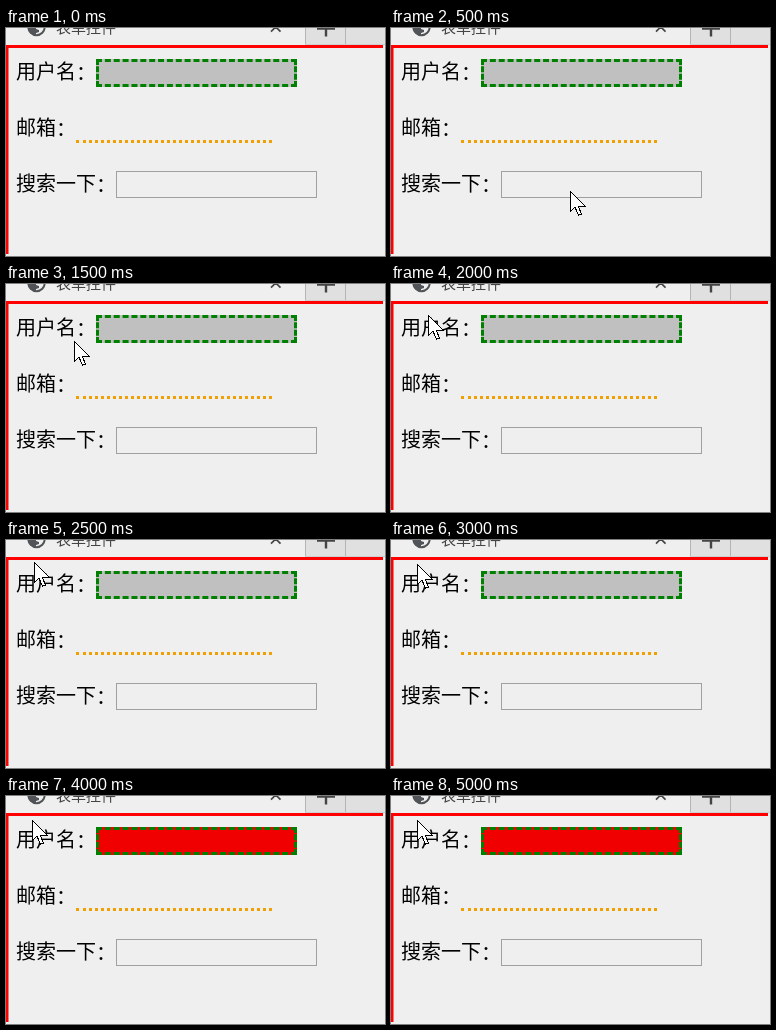
An HTML page that plays this animation: 379x228 px, repeating every 5500 ms.

```html
<!DOCTYPE html>
<html lang="zh-CN">
<head>
<meta charset="utf-8">
<title>表单控件</title>
<style>
  html, body { margin: 0; width: 100%; height: 100%; overflow: hidden; background: #efefef; }
  svg { position: absolute; left: 0; top: 0; }
  text { font-family: "Noto Sans CJK SC", "Noto Sans CJK", sans-serif; font-size: 20px; font-weight: 350; }
  .field { position: absolute; box-sizing: border-box; }
  #user { left: 90px; top: 31px; width: 201px; height: 28px; border: 3px dashed green; background: #c0c0c0; }
  #user.focused { background: #f00000; }
  #mail { left: 70px; top: 112px; width: 196px; height: 3px; border-bottom: 3px dotted #f0a000; }
  #search { left: 110px; top: 143px; width: 201px; height: 27px; border: 1px solid #a0a0a0; }
  #caret { position: absolute; left: 93px; top: 36px; width: 1px; height: 19px; background: #000; }
</style>
</head>
<body>
<svg width="379" height="228" viewBox="0 0 379 228">
  <!-- tab strip -->
  <path fill="#e0e0e0" d="M299 0H379V17H299Z"/>
  <path fill="none" stroke="#b4b4b4" d="M299.5 0V17M339.5 0V17"/>
  <path fill="none" stroke="#cfcfcf" d="M299 16.5H379"/>
  <circle cx="30.5" cy="-1" r="8.2" fill="#efefef" stroke="#505357" stroke-width="2"/>
  <path fill="#505357" d="M22 -1H30V1L33 2V4L30 5V7.5Q23 6 22 -1Z"/>
  <text x="50" y="5" style="font-size:15px" fill="#444">表单控件</text>
  <path fill="none" stroke="#444" stroke-width="1.7" d="M265 -6L274.5 3.7M274.5 -6L265 3.7"/>
  <path fill="none" stroke="#444" stroke-width="2.4" d="M311 .5H329M320 -9V8.5"/>
  <!-- page border -->
  <path fill="red" d="M0 17H377V20H2.5V226H0Z"/>
  <g id="labels"></g>
</svg>
<div class="field" id="user"></div>
<div class="field" id="mail"></div>
<div class="field" id="search"></div>
<div id="caret"></div>
<svg width="379" height="228" viewBox="0 0 379 228">
  <path id="cursor" fill="#fff" stroke="#000" shape-rendering="crispEdges" d="M.5 .5V20.5L5 16.2L8.5 24.3L11.5 23L8.2 15H14.8Z"/>
</svg>
<script>
const LOOP = 5500, STEP = 500, FOCUS_STEP = 7;
// Pointer tip at each step; it rests at the last point.
const pointer = [null, [179, 163], [72, 113], [68, 57], [37, 31], [28, 22], [26, 24]];
const byId = id => document.getElementById(id);

byId('labels').innerHTML = [['用户名', 51], ['邮箱', 107], ['搜索一下', 163]]
  .map(([label, y]) => `<text x="10" y="${y}">${label}<tspan dy="1">：</tspan></text>`).join('');

function render(time) {
  const step = Math.floor(time % LOOP / STEP);
  const tip = pointer[Math.min(step, pointer.length - 1)];
  const focused = step >= FOCUS_STEP;
  const caretOn = focused && (step - FOCUS_STEP) % 2 === 0;

  byId('cursor').style.display = tip ? '' : 'none';
  if (tip) byId('cursor').setAttribute('transform', `translate(${tip})`);
  byId('user').classList.toggle('focused', focused);
  byId('caret').style.display = caretOn ? '' : 'none';
}

const start = performance.now();
function tick() {
  render(performance.now() - start);
  requestAnimationFrame(tick);
}
tick();
</script>
</body>
</html>
```
